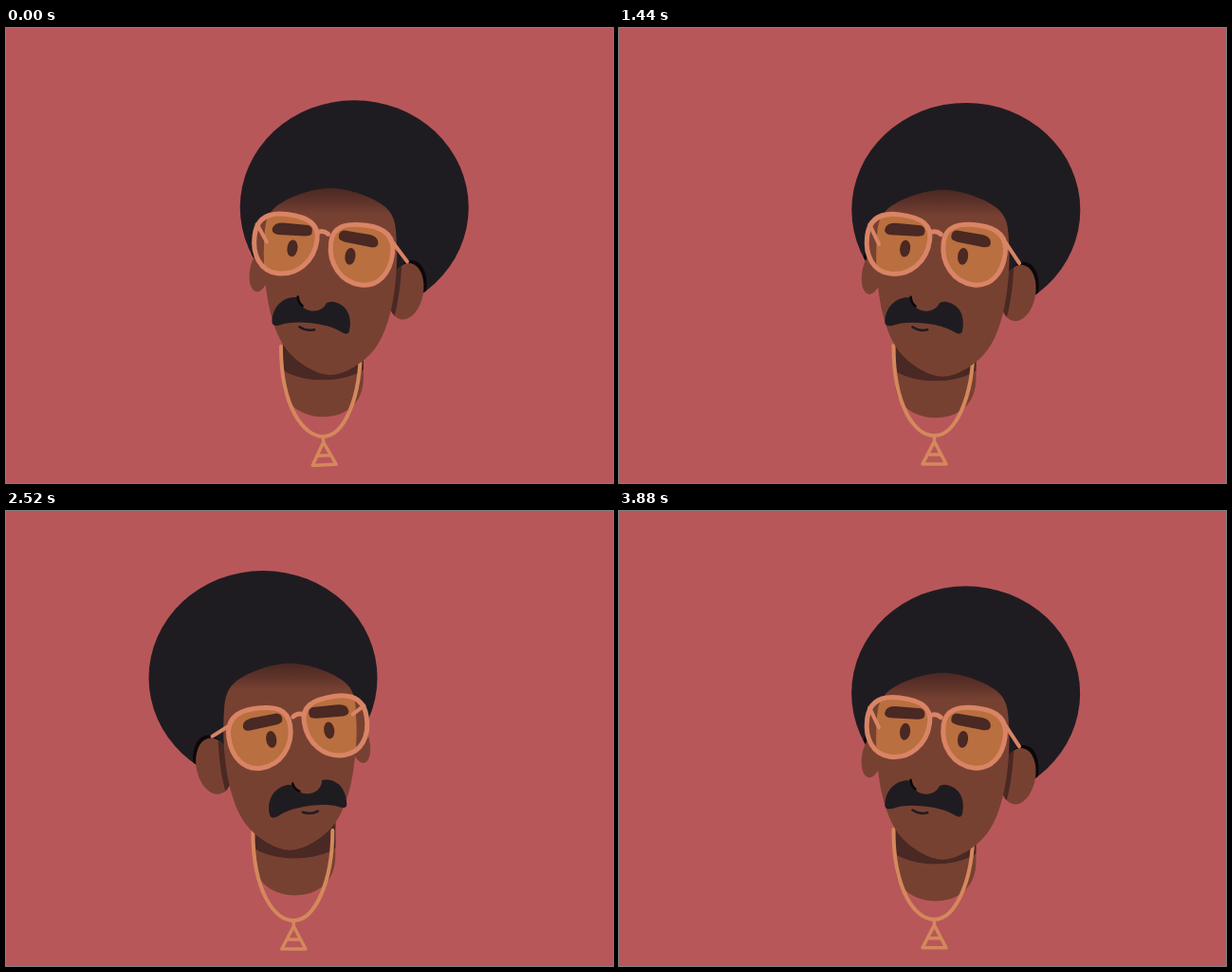
An HTML page with a canvas that plays this animation: 640 px wide and 480 px high, repeating every 3.96 s.

```html
<!DOCTYPE html>
<html lang="en">
<head>
<meta charset="utf-8">
<title>Head bob</title>
<style>
html, body { margin: 0; width: 100%; height: 100%; overflow: hidden; background: #b85759; }
canvas { display: block; }
</style>
</head>
<body>
<canvas id="stage" width="640" height="480"></canvas>
<script>
const ctx = document.getElementById('stage').getContext('2d');
const BG = '#b85759', SKIN = '#774132', SHADE = '#4a2823', HAIR = '#1f1c21',
      BLACK = '#0b070a', FRAME = '#d98465', AMBER = '#b96f3f', GOLD = '#d4885c';
const STEP = 40, LOOP = 3960, CYCLE = 48, BEAT = 12;
const SIDES = [1, -1];

const LENS = new Path2D('M-33-5C-33-25-20-31.5-2-31.5C22-31.5 33-25 33-9C33 14 17 31.5-4 31.5C-22 31.5-33 16-33-5Z');
const BROW = new Path2D('M-21 3Q-21-6-8-6L16-7Q22-6 21 1Q21 4 14 5L-14 7Q-20 7-21 3Z');
const TACHE = new Path2D('M-41 12C-43-6-30-18-16-17C-8-16-5-9 3-9C10-9 12-18 22-17C35-16 43-4 41 12Q40 17 32 13C18 6-18 6-32 14Q-40 17-41 12Z');
const NECK = new Path2D('M-42-90L-42-35C-42-12-20 0 0 0C24 0 43-14 43-42L43-90Z');

// Right half of the face outline, from hairline peak to chin
const PROFILE = [[0, -12], [58, 8], [70, 49], [64, 116], [43, 162], [0, 185]];

// 1 on the right, 0 on the left, with quick eased crossings
function swing(step) {
  const away = Math.abs((step + CYCLE - 16) % CYCLE - CYCLE / 2);
  const k = Math.max(0, Math.min(1, 2 - away / 8));
  return k * k * (3 - 2 * k);
}

// 1 at the bottom of the nod, 0 at the top; slightly later on the right
function nod(step) {
  const angle = (step - 45.6 - swing(step)) / BEAT * Math.PI * 2;
  return Math.pow((1 + Math.cos(angle)) / 2, 0.75);
}

// Closed Catmull-Rom curve
function smooth(pts) {
  const path = new Path2D(), n = pts.length, at = i => pts[(i + n) % n];
  path.moveTo(...pts[0]);
  for (let i = 0; i < n; i++) {
    const a = at(i - 1), b = at(i), c = at(i + 1), d = at(i + 2);
    path.bezierCurveTo(
      b[0] + (c[0] - a[0]) / 6, b[1] + (c[1] - a[1]) / 6,
      c[0] - (d[0] - b[0]) / 6, c[1] - (d[1] - b[1]) / 6, c[0], c[1]);
  }
  path.closePath();
  return path;
}

function oval(x, y, rx, ry, rot = 0) {
  const p = new Path2D();
  p.ellipse(x, y, rx, ry, rot, 0, Math.PI * 2);
  return p;
}

function fill(path, color) {
  ctx.fillStyle = color;
  ctx.fill(path);
}

function stroke(path, color, width) {
  ctx.strokeStyle = color;
  ctx.lineWidth = width;
  ctx.stroke(path);
}

function placed([x, y], rot, flip, draw) {
  ctx.save();
  ctx.translate(x, y);
  ctx.rotate(rot);
  ctx.scale(flip, 1);
  draw();
  ctx.restore();
}

function clipped(path, draw) {
  ctx.save();
  ctx.clip(path);
  draw();
  ctx.restore();
}

// Hair centre, turn and pitch of the head, and how to place a point on it
function poseAt(step) {
  const low = 2 * nod(step) - 1;
  const cx = 271 + 103.5 * swing(step) - 9 * low, cy = 176 + 16.5 * low;
  const yaw = (cx - 322) / 52;
  const pitch = 17 * low + 8 * Math.abs(yaw);
  const rig = (x, y, depth, front = 1, roll = 0.16) =>
    [cx + x - depth * yaw, cy + y - front * pitch + roll * yaw * x];
  return { cx, cy, yaw, rig, low };
}

function drawEars({ yaw, rig }, hair, face) {
  const ears = SIDES.map(side => {
    const near = side * yaw, [x, y] = rig(side * 77, 83, 26, 0.25);
    return [x, y, 14.5 + near * 4.5, 30 + Math.min(0, near) * 9, yaw * 0.2];
  });
  clipped(hair, () => ears.forEach(([x, y, ...shape], i) =>
    fill(oval(x + SIDES[i] * 3, y - 3, ...shape), BLACK)));
  for (const e of ears) {
    const ear = oval(...e);
    fill(ear, SKIN);
    clipped(ear, () => {
      ctx.translate(6 * yaw, 0);
      fill(face, SHADE);
    });
  }
}

function drawNeck(x, y) {
  placed([x, y], 0, 1, () => {
    fill(NECK, SKIN);
    clipped(NECK, () => fill(oval(0, -64, 52, 25), SHADE));
  });
}

function drawChain(x, bottom, speed) {
  const bx = x - 0.65 * speed;
  stroke(new Path2D(`M${x - 43} ${bottom - 95}C${x - 43} ${bottom - 30} ${bx - 20} ${bottom} ${bx} ${bottom}` +
    `C${bx + 22} ${bottom} ${x + 41} ${bottom - 40} ${x + 41} ${bottom - 95}`), GOLD, 4);
  placed([bx, bottom], speed * 0.02, 1, () =>
    stroke(new Path2D('M0 0V6L12.5 30H-12.5L0 6M-6 20H6'), GOLD, 3.5));
}

function drawFace({ yaw, rig }, face) {
  const peak = rig(...PROFILE[0], 29, 0.4)[1], tilt = yaw * 0.14;
  const fade = ctx.createLinearGradient(0, peak, 0, peak + 28);
  fade.addColorStop(0, SHADE);
  fade.addColorStop(0.5, '#5f332a');
  fade.addColorStop(1, SKIN);
  fill(face, fade);

  placed(rig(-2, 135, 49), tilt, 1, () => fill(TACHE, HAIR));
  placed(rig(-3, 149, 54), tilt, 1, () => stroke(new Path2D('M-8-1Q0 3 8 0'), HAIR, 2.5));
  placed(rig(-1, 117, 49), tilt, 1, () => {
    fill(oval(0, 0, 15, 13), SKIN);
    stroke(new Path2D('M-16 0Q-15 6-10 9'), BLACK, 2.5);
  });
}

function drawGlasses({ yaw, rig }, face) {
  const tilt = yaw * 0.15;
  const pair = (x, y, depth, draw) => SIDES.forEach(side =>
    placed(rig(side * x, y, depth), tilt, -side, () => draw(side)));

  pair(40, 65, 38, () => fill(LENS, SKIN));
  clipped(face, () => pair(40, 65, 38, () => fill(LENS, AMBER)));
  pair(35, 49, 35, () => fill(BROW, SHADE));
  pair(30.5, 68, 40, () => fill(oval(0, 0, 5.5, 9), SHADE));
  pair(40, 65, 38, () => stroke(LENS, FRAME, 5));

  for (const side of SIDES) {
    const [x, y] = rig(side * 40, 65, 38), [ex, ey] = rig(side * 74, 52, 21, 0.25);
    const dx = side * 32, dy = -17, c = Math.cos(tilt), s = Math.sin(tilt);
    stroke(new Path2D(`M${x + dx * c - dy * s} ${y + dx * s + dy * c}L${ex} ${ey}`), FRAME, 4);
  }
  placed(rig(0, 45, 38), tilt, 1, () => stroke(new Path2D('M-6 3Q0-1 6 3'), FRAME, 5));
}

function draw(step) {
  const pose = poseAt(step), { cx, cy, yaw, rig, low } = pose;
  const speed = 52 * (swing(step + 1) - swing(step - 1));
  const half = PROFILE.slice(1, -1).reverse().map(([x, y]) => [-x, y]);
  const face = smooth([...PROFILE, ...half].map(([x, y]) => rig(x, y, 29, 0.4, 0)));
  const hair = oval(cx, cy, 120.5, 113);
  const neckX = 320 + 16 * yaw;

  ctx.fillStyle = BG;
  ctx.fillRect(0, 0, 640, 480);
  fill(hair, HAIR);
  drawEars(pose, hair, face);
  drawNeck(neckX, 405.5 + 6 * low);
  drawChain(neckX - 1, 424 + (11 - 4 * swing(step)) * nod(step - 1), speed);
  drawFace(pose, face);
  drawGlasses(pose, face);
}

// A few steps are held for two ticks
function stepAt(ms) {
  const tick = Math.floor((ms % LOOP) / STEP);
  return (tick - [7, 21, 98].filter(hold => tick >= hold).length) % CYCLE;
}

ctx.lineCap = ctx.lineJoin = 'round';
const start = performance.now();
function frame() {
  draw(stepAt(performance.now() - start));
  requestAnimationFrame(frame);
}
frame();
</script>
</body>
</html>
```
